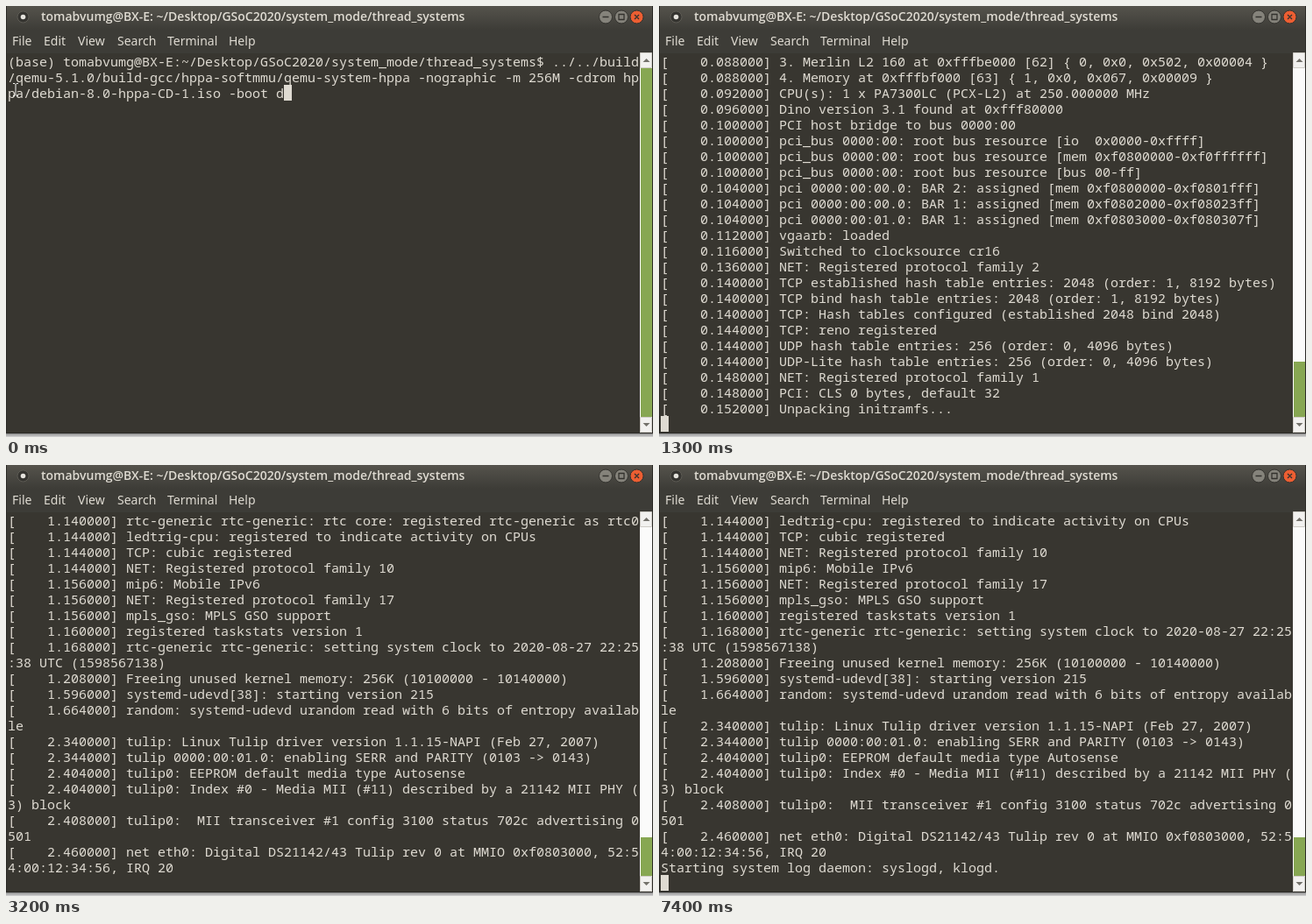
An HTML page that plays this animation: 738x492 px, repeating every 8 s.

```html
<!DOCTYPE html>
<html lang="en">
<head>
<meta charset="utf-8">
<title>Terminal boot log</title>
<style>
  html, body { margin: 0; width: 100%; height: 100%; overflow: hidden; background: #383630; }
  svg { display: block; width: 738px; height: 492px; }
  text { fill: #dfdbd2; white-space: pre; }
  .title { font: 600 14px "Open Sans", "Noto Sans", sans-serif; }
  .menu { font: 14px "Noto Sans", "Open Sans", sans-serif; }
  .log { font: 15px "Noto Sans Mono", "DejaVu Sans Mono", monospace; font-variant-ligatures: none; }
</style>
</head>
<body>
<svg viewBox="0 0 738 492">
  <defs>
    <linearGradient id="bar" x2="0" y2="1">
      <stop offset="0" stop-color="#55534c"/><stop offset="1" stop-color="#3d3c37"/>
    </linearGradient>
    <linearGradient id="shadow" x2="0" y2="1">
      <stop offset="0" stop-color="#8c8c8c"/><stop offset="1" stop-color="#d4d4d4"/>
    </linearGradient>
  </defs>
  <rect width="738" height="492" fill="#383630"/>
  <rect width="738" height="27" fill="url(#bar)"/>
  <rect y="27" width="738" height="27" fill="#3d3c37"/>
  <circle cx="19.500" cy="12.500" r="6.500" fill="#353430" stroke="#5d5b54"/>
  <circle cx="19.500" cy="12.500" r="2.800" fill="#e4e2dc"/>
  <text class="title" x="40" y="17">tomabvumg@BX-E: ~/Desktop/GSoC2020/system_mode/thread_systems</text>
  <g id="menu" class="menu"></g>
  <g stroke="#33322e">
    <circle cx="684" cy="12.500" r="7.500" fill="#85837b"/>
    <circle cx="702" cy="12.500" r="7.500" fill="#85837b"/>
    <circle cx="719.500" cy="12.500" r="7.500" fill="#ec5e32"/>
    <path d="M680.500 12.500h7M699 9.500h6v6h-6zM717 10l5 5m0-5l-5 5" fill="none" stroke-width="1.300"/>
  </g>
  <g id="log" class="log"></g>
  <rect id="cursor" width="9" height="18" fill="#dfdbd2"/>
  <path id="pointer" d="M8 88.500h2l1 1 1-1h2M11 89.500v12M8 102.500h2l1-1 1 1h2" fill="none" stroke="#f4f4f0"/>
  <rect x="723" y="54" width="14" height="433" fill="#fbfbfa"/>
  <rect id="thumb" x="724" width="13" fill="#87a752"/>
  <g fill="#f2f1ef" stroke="#cfccc6">
    <path d="M723.500 53.500h13v17h-13zM723.500 469.500h13v17h-13z"/>
  </g>
  <path d="M726.500 64l4-4 4 4zM726.500 476l4 4 4-4z" fill="#73716b"/>
  <path d="M.5 0V487.500H737.500V0" fill="none" stroke="#2c2b27"/>
  <rect y="488" width="738" height="4" fill="url(#shadow)"/>
</svg>
<script>
const LOOP = 8000, COLS = 80, ROWS = 24, CELL = 9, LINE = 18, LEFT = 2, TOP = 54;
const rule = '-'.repeat(78);

// [time, output appended then]; a leading "s.mmm" becomes a kernel time stamp
const output = [
[0, `(base) tomabvumg@BX-E:~/Desktop/GSoC2020/system_mode/thread_systems$ ../../build/qemu-5.1.0/build-gcc/hppa-softmmu/qemu-system-hppa -nographic -m 256M -cdrom hppa/debian-8.0-hppa-CD-1.iso -boot d`],
[100, `\n`],
[200, `
Firmware Version  6.1

Duplex Console IO Dependent Code (IODC) revision 1

${rule}
  (c) Copyright 2017-2020 SeaBIOS developers.
${rule}

  Processor   Speed            State           Coprocessor State  Cache Size
  ---------  --------   ---------------------  -----------------  ----------
      0      250 MHz    Active                 Functional            0 KB


  Available memory:          256 MB
  Good memory required:       16 MB

  Primary boot path:    FWSCSI.6.0
  Alternate boot path:  LAN.0.0.0.0.0.0
  Console path:         SERIAL_1.9600.8.none
  Keyboard path:        PS2

Boot path initialized.
Attempting to load IPL.
`],
[300, `
HARD Booted.
palo ipl 1.95

Partition Start(MB) End(MB) Id Type
1               1      31   f0 Palo

Boot image contains:
    0/vmlinux32 6241704 bytes @ 0x11000
    0/vmlinux64 8213528 bytes @ 0x605000
    0/ramdisk32 9183434 bytes @ 0xddb000
    0/ramdisk64 9518072 bytes @ 0x169d800

Information: No console specified on kernel command line. This is normal.
PALO will choose the console currently used by firmware (serial).
Command line for kernel: 'console=ttyS0 TERM=vt102 palo_kernel=0/vmlinux'
Selected kernel: /vmlinux from partition 0
Selected ramdisk: /ramdisk from partition 0
ELF32 executable
Entry 10100018 first 10100000 n 4
Segment 0 load 10100000 size 237568 mediaptr 0x1000
Segment 1 load 10140000 size 3985408 mediaptr 0x3b000
Segment 2 load 1050d000 size 778240 mediaptr 0x408000
Segment 3 load 105cb000 size 646560 mediaptr 0x4c6000
Loading ramdisk 9183434 bytes @ 0f72c000...
Branching to kernel entry point 0x10100018.  If this is the last
message you see, you may need to switch your console.
`],
[400, `0.000 Initializing cgroup subsys cpuset
0.000 Initializing cgroup subsys cpu
0.000 Initializing cgroup subsys cpuacct
0.000 Linux version 3.16.0-4-parisc (gcc version 4.8.4 (Debian 4.8.4-1) ) #1 Debian 3.16.7-ckt9-2 (2015-04-13)
0.000 unwind_init: start = 0x104a5bd0, end = 0x104d1f40, entries = 9319
0.000 FP[0] enabled: Rev 1 Model 16
0.000 The 32-bit Kernel has started...
0.000 bootconsole [ttyB0] enabled
0.000 Initialized PDC Console for debugging.
0.000 Determining PDC firmware type: Snake.
0.000 model 00005020 00000481 00000000 00000002 77e45e84 100000f0
0.000 vers  00000200
0.000 CPUID vers 0 rev 0 (0x00000000)
0.000 capabilities 0x2
0.000 model 9000/778/B160L
0.000 Memory Ranges:
0.000 Total Memory: 256 MB
`],
[500, `0.000 initrd: 1f72c000-1ffee0ca
0.000 initrd: reserving 0f72c000-0ffee0ca (mem_max 10000000)
0.000 Zone ranges:
0.000   Normal   [mem 0x00000000-0x0fffffff]
0.000 Movable zone start for each node
0.000 Early memory node ranges
0.000   node   0: [mem 0x00000000-0x0fffffff]
0.000 On node 0 totalpages: 65536
0.000 free_area_init_node: node 0, pgdat 10573040, node_mem_map 1069c000
0.000   Normal zone: 512 pages used for memmap
0.000   Normal zone: 0 pages reserved
0.000   Normal zone: 65536 pages, LIFO batch:15
0.000 pcpu-alloc: s0 r0 d32768 u32768 alloc=1*32768
0.000 pcpu-alloc: [0] 0
0.000 Built 1 zonelists in Zone order, mobility grouping on.  Total pages: 65024
0.000 Kernel command line: console=ttyS0 TERM=vt102 palo_kernel=0/vmlinux
`],
[600, `0.000 Enabling regular chassis codes support v0.05
0.000 Cache flush threshold set to 1024 KiB
0.000 PID hash table entries: 1024 (order: 0, 4096 bytes)
0.000 Dentry cache hash table entries: 32768 (order: 5, 131072 bytes)
0.000 Inode-cache hash table entries: 16384 (order: 4, 65536 bytes)
0.000 Sorting __ex_table...
0.000 Memory: 241928K/262144K available (3892K kernel code, 1546K rwdata, 778K rodata, 256K init, 402K bss)
0.000 virtual kernel memory layout:
`],
[700, `    0.000000]     vmalloc : 0x00810000 - 0x0f000000   ( 231 MB)
    0.000000]     memory  : 0x10000000 - 0x20000000   ( 256 MB)
    0.000000]       .init : 0x10100000 - 0x10140000   ( 256 kB)
    0.000000]       .data : 0x1050d000 - 0x1068f9a0   (1546 kB)
    0.000000]       .text : 0x10140000 - 0x1050d000   (3892 kB)
0.000 NR_IRQS:96
0.000 Console: colour dummy device 160x64
0.000 Calibrating delay loop... 1537.02 BogoMIPS (lpj=3074048)
0.028 pid_max: default: 32768 minimum: 301
0.028 Security Framework initialized
0.028 AppArmor: AppArmor disabled by boot time parameter
0.028 Yama: disabled by default; enable with sysctl kernel.yama.*
0.032 Mount-cache hash table entries: 1024 (order: 0, 4096 bytes)
0.032 Mountpoint-cache hash table entries: 1024 (order: 0, 4096 bytes)
0.040 Initializing cgroup subsys memory
0.044 Initializing cgroup subsys devices
0.044 Initializing cgroup subsys freezer
0.044 Initializing cgroup subsys net_cls
0.044 Initializing cgroup subsys blkio
0.044 Initializing cgroup subsys perf_event
0.044 Initializing cgroup subsys net_prio
0.064 devtmpfs: initialized
0.076 NET: Registered protocol family 16
`],
[800, `0.080 EISA bus registered
0.084 Searching for devices...
0.088 Found devices:
0.088 1. Dino PCI Bridge at 0xfff80000 [8] { 13, 0x0, 0x680, 0x0000a }
0.088 2. Dino RS-232 at 0xfff83000 [8/0/63] { 10, 0x0, 0x006, 0x0008c }
0.088 3. Merlin L2 160 at 0xfffbe000 [62] { 0, 0x0, 0x502, 0x00004 }
0.088 4. Memory at 0xfffbf000 [63] { 1, 0x0, 0x067, 0x00009 }
0.092 CPU(s): 1 x PA7300LC (PCX-L2) at 250.000000 MHz
0.096 Dino version 3.1 found at 0xfff80000
0.100 PCI host bridge to bus 0000:00
0.100 pci_bus 0000:00: root bus resource [io  0x0000-0xffff]
0.100 pci_bus 0000:00: root bus resource [mem 0xf0800000-0xf0ffffff]
0.100 pci_bus 0000:00: root bus resource [bus 00-ff]
0.104 pci 0000:00:00.0: BAR 2: assigned [mem 0xf0800000-0xf0801fff]
0.104 pci 0000:00:00.0: BAR 1: assigned [mem 0xf0802000-0xf08023ff]
0.104 pci 0000:00:01.0: BAR 1: assigned [mem 0xf0803000-0xf080307f]
`],
[900, `0.112 vgaarb: loaded
0.116 Switched to clocksource cr16
0.136 NET: Registered protocol family 2
0.140 TCP established hash table entries: 2048 (order: 1, 8192 bytes)
0.140 TCP bind hash table entries: 2048 (order: 1, 8192 bytes)
0.140 TCP: Hash tables configured (established 2048 bind 2048)
0.144 TCP: reno registered
0.144 UDP hash table entries: 256 (order: 0, 4096 bytes)
0.144 UDP-Lite hash table entries: 256 (order: 0, 4096 bytes)
0.148 NET: Registered protocol family 1
0.148 PCI: CLS 0 bytes, default 32
0.152 Unpacking initramfs...
`],
[1700, `0.984 Freeing initrd memory: 8968K (1f72c000 - 1ffee000)
0.988 Performance counters: No support detected
0.988 futex hash table entries: 256 (order: 0, 7168 bytes)
0.992 audit: initializing netlink subsys (disabled)
0.992 audit: type=2000 audit(1598567137.988:1): initialized
1.000 zbud: loaded
1.004 VFS: Disk quotas dquot_6.5.2
1.004 Dquot-cache hash table entries: 1024 (order 0, 4096 bytes)
1.008 msgmni has been set to 490
1.016 alg: No test for stdrng (krng)
1.020 Block layer SCSI generic (bsg) driver version 0.4 loaded
`],
[1800, `1.024 io scheduler noop registered
1.024 io scheduler deadline registered
1.028 io scheduler cfq registered (default)
1.032 Soft power switch support not available.
1.036 pci_hotplug: PCI Hot Plug PCI Core version: 0.5
1.040 pciehp: PCI Express Hot Plug Controller Driver version: 0.4
1.044 PDC nonvolatile storage support enabled
1.052 chassis warnings driver enabled
1.060 fbcon: no graphics device detected
1.064 Console: switching to colour dummy device 160x64
1.068 Linux agpgart interface v0.103
1.072 i8042: PNP: No PS/2 controller found.
1.076 i8042: Probing ports directly.
1.080 brd: module loaded
1.080 loop: module loaded
1.080 mdio: fixed bus: probed
1.080 libphy: probed
1.080 PDC console ready
1.084 PDC Stable Storage facility v0.30
1.088 STI GSC/PCI core graphics driver Version 0.9b
`],
[1900, `1.092 Serial: 8250/16550 driver, 4 ports, IRQ sharing enabled
1.100 console [ttyS0] disabled
1.104 console [ttyS0] disabled
1.128 8:0:63: ttyS0 at MMIO 0xfff83800 (irq = 18, base_baud = 454545) is a 16550A
1.128 console [ttyS0] enabled
1.128 console [ttyS0] enabled
1.132 bootconsole [ttyB0] disabled
1.132 bootconsole [ttyB0] disabled
1.136 mousedev: PS/2 mouse device common for all mice
1.140 rtc-generic rtc-generic: rtc core: registered rtc-generic as rtc0
1.144 ledtrig-cpu: registered to indicate activity on CPUs
1.144 TCP: cubic registered
1.144 NET: Registered protocol family 10
1.156 mip6: Mobile IPv6
1.156 NET: Registered protocol family 17
1.156 mpls_gso: MPLS GSO support
1.160 registered taskstats version 1
1.168 rtc-generic rtc-generic: setting system clock to 2020-08-27 22:25:38 UTC (1598567138)
1.208 Freeing unused kernel memory: 256K (10100000 - 10140000)
`],
[2300, `1.596 systemd-udevd[38]: starting version 215
`],
[2400, `1.664 random: systemd-udevd urandom read with 6 bits of entropy available
`],
[3100, `2.340 tulip: Linux Tulip driver version 1.1.15-NAPI (Feb 27, 2007)
2.344 tulip 0000:00:01.0: enabling SERR and PARITY (0103 -> 0143)
`],
[3200, `2.404 tulip0: EEPROM default media type Autosense
2.404 tulip0: Index #0 - Media MII (#11) described by a 21142 MII PHY (3) block
2.408 tulip0:  MII transceiver #1 config 3100 status 702c advertising 0501
2.460 net eth0: Digital DS21142/43 Tulip rev 0 at MMIO 0xf0803000, 52:54:00:12:34:56, IRQ 20
`],
[5700, `Starting system log daemon:`],
[5800, ` syslogd, klogd.
`]];

const cursorOn = [[0, 100], [1300, 1700], [2700, 3100], [3800, 4300], [5000, 5700], [6200, 6800], [7400, LOOP]];

const $ = id => document.getElementById(id);
const set = (el, attrs) => { for (const k in attrs) el.setAttribute(k, attrs[k]); };
function addText(parent, x, y, content = '') {
  const el = document.createElementNS('http://www.w3.org/2000/svg', 'text');
  set(el, { x, y });
  el.textContent = content;
  return parent.appendChild(el);
}

const stamp = line => line.replace(/^(\d\.\d{3}) /, '[    $1000] ');
const wrap = line => stamp(line).match(new RegExp(`.{1,${COLS}}`, 'g')) || [''];
let written = '';
const screens = output.map(([time, chunk]) => {
  written += chunk;
  return { time, rows: written.split('\n').flatMap(wrap) };
});

[['File', 7], ['Edit', 43], ['View', 82], ['Search', 127], ['Terminal', 184], ['Help', 254]]
  .forEach(([label, x]) => addText($('menu'), x, 45, label));
const lines = Array.from({ length: ROWS }, (_, i) => addText($('log'), LEFT, TOP + 15 + i * LINE));

let shown;
function showScreen(screen) {
  if (screen === shown) return;
  shown = screen;
  const view = screen.rows.slice(-ROWS);
  lines.forEach((el, i) => { el.textContent = view[i] || ''; });
  const last = view.length - 1;
  set($('cursor'), { x: LEFT + view[last].length * CELL, y: TOP + last * LINE });
  const height = Math.round(398 * ROWS / Math.max(ROWS, screen.rows.length));
  set($('thumb'), { y: 469 - height, height });
}

function draw(t) {
  showScreen(screens.filter(s => s.time <= t).pop());
  set($('cursor'), { visibility: cursorOn.some(([a, b]) => t >= a && t < b) ? 'visible' : 'hidden' });
  set($('pointer'), { visibility: t < 100 ? 'visible' : 'hidden' });
}

const start = performance.now();
function tick() {
  draw((performance.now() - start) % LOOP);
  requestAnimationFrame(tick);
}
tick();
</script>
</body>
</html>
```
